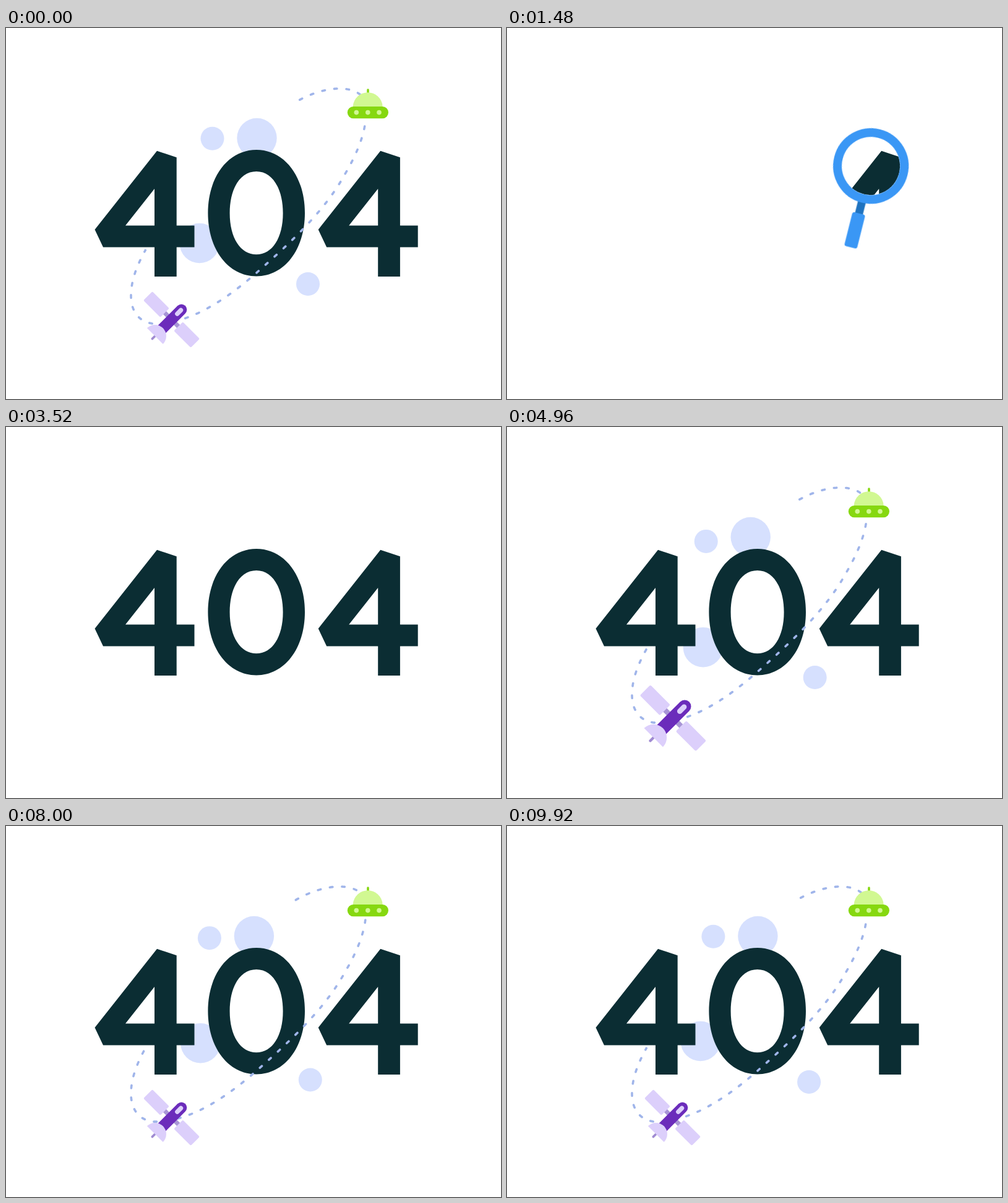
An HTML page that plays this animation: 800x600 px, repeating every 9960 ms.

```html
<!DOCTYPE html>
<html lang="en">
<head>
<meta charset="utf-8">
<title>404</title>
<style>
@property --x { syntax: "<number>"; inherits: true; initial-value: 138; }
@property --y { syntax: "<number>"; inherits: true; initial-value: 411; }
@property --turn { syntax: "<number>"; inherits: true; initial-value: 30; }
@property --zoom { syntax: "<number>"; inherits: true; initial-value: 40; }

html, body { margin: 0; width: 100%; height: 100%; overflow: hidden; background: #fff; }
svg { position: absolute; left: 0; top: 0; width: 800px; height: 600px; }

.stage {
  --loop: 9960ms;
  --swing: cubic-bezier(.37, 0, .63, 1);
  position: relative; width: 800px; height: 600px; overflow: hidden;
  animation: x var(--loop) var(--swing) infinite, y var(--loop) var(--swing) infinite,
    turn var(--loop) var(--swing) infinite, zoom var(--loop) var(--swing) infinite;
}

/* The digits show only through the glass until it has grown past them. */
.digits {
  fill: #0b2d33;
  clip-path: circle(calc(var(--zoom) * 47px) at calc(var(--x) * 1px) calc(var(--y) * 1px));
}
.lens {
  transform: translate(calc(var(--x) * 1px), calc(var(--y) * 1px))
    rotate(calc(var(--turn) * 1deg)) scale(var(--zoom));
  animation: lens-fade var(--loop) linear infinite;
}

.dot, .ufo, .satellite { transform-box: fill-box; transform-origin: center; }
.dot {
  fill: #d6e0fe;
  animation: dot-pop var(--loop) ease-out infinite, drift var(--loop) linear infinite;
}
.ufo { animation: ufo-pop var(--loop) ease-in-out infinite; }
.satellite { animation: satellite-pop var(--loop) ease-in-out infinite; }

.trail {
  fill: none; stroke: #a0b5ea; stroke-width: 3.6; stroke-linecap: round;
  stroke-dasharray: 4.5 15.14;
  animation: flow var(--loop) linear infinite;
}
.reveal {
  fill: none; stroke: #fff; stroke-width: 16; stroke-dasharray: 820;
  animation: draw var(--loop) ease-in-out infinite;
}

@keyframes x {
  0%, 3.715% { --x: 138; }
  18.25%, 20.28% { --x: 653; }
  30.522%, 100% { --x: 388; }
}
@keyframes y {
  0%, 3.715% { --y: 411; }
  12.8% { --y: 213; }
  26.155% { --y: 391; }
  30.522%, 100% { --y: 318; }
}
@keyframes turn {
  0%, 8.966% { --turn: 30; }
  28.233%, 100% { --turn: -45; }
}
@keyframes zoom {
  0% { --zoom: 40; animation-timing-function: step-end; }
  .4% { --zoom: 0; animation-timing-function: ease-out; }
  3.7%, 30.522% { --zoom: 1; }
  34.9% { --zoom: 6.4; animation-timing-function: step-end; }
  35.1%, 100% { --zoom: 40; }
}
@keyframes lens-fade {
  0% { opacity: 0; animation-timing-function: step-end; }
  .4%, 32.6% { opacity: 1; }
  34.9%, 100% { opacity: 0; }
}
@keyframes dot-pop {
  0% { scale: 1; animation-timing-function: step-end; }
  .4%, 37.7% { scale: 0; }
  41% { scale: 1.1; }
  43%, 100% { scale: 1; }
}
@keyframes ufo-pop {
  0% { scale: 1; animation-timing-function: step-end; }
  .4%, 39.8% { scale: 0; }
  42.4% { scale: 1.2; }
  44.4% { scale: .95; }
  46.4%, 100% { scale: 1; }
}
@keyframes satellite-pop {
  0% { scale: 1; animation-timing-function: step-end; }
  .4%, 47.2% { scale: 0; }
  49.8% { scale: 1.18; }
  51.8% { scale: .95; }
  53.8%, 100% { scale: 1; }
}
@keyframes drift {
  0% { translate: 0 0; animation-timing-function: step-end; }
  .4%, 37.75% { translate: var(--dx) var(--dy); }
  100% { translate: 0 0; }
}
@keyframes flow {
  0% { stroke-dashoffset: -9.75; animation-timing-function: step-end; }
  .4%, 37.75% { stroke-dashoffset: 139.3; }
  100% { stroke-dashoffset: -10.7; }
}
@keyframes draw {
  0% { stroke-dashoffset: 0; animation-timing-function: step-end; }
  .4%, 37.75% { stroke-dashoffset: 820; }
  47.8%, 100% { stroke-dashoffset: 0; }
}
</style>
</head>
<body>
<div class="stage">
  <svg viewBox="0 0 800 600">
    <circle class="dot" cx="333.5" cy="178.7" r="19" style="--dx:-14.6px;--dy:7.7px"/>
    <circle class="dot" cx="405.5" cy="178" r="32.2" style="--dx:-14.6px;--dy:0px"/>
    <circle class="dot" cx="312.7" cy="348" r="32.2" style="--dx:5.2px;--dy:10.3px"/>
    <circle class="dot" cx="488" cy="414" r="19" style="--dx:12px;--dy:-11.2px"/>
  </svg>

  <svg class="digits" viewBox="0 0 800 600" fill-rule="evenodd">
    <path id="four" d="M143.5 326 244 198.7 275.7 209.3V319.5H304.5V354.5H275.7V402H240V354.5H157ZM240 260V319.5H193Z"/>
    <use href="#four" x="361.2"/>
    <path d="M404.7 197C450 197 483 240 483 299.3S450 401.5 404.7 401.5 326.4 358.5 326.4 299.3 359.5 197 404.7 197Z
      M404.7 232C379 232 361.6 259 361.6 299.3S379 366.3 404.7 366.3 447.6 339.5 447.6 299.3 430 232 404.7 232Z"/>
  </svg>

  <svg viewBox="0 0 800 600">
    <defs>
      <path id="route" d="M466 121C515 92 560 92 577 112C588 140 580 182 548 236C516 295 460 347 407 394
        C365 431 300 481 236 478C212 474 202 455 202 433C202 408 212 383 226 358"/>
      <mask id="drawn" maskUnits="userSpaceOnUse" x="0" y="0" width="800" height="600">
        <use class="reveal" href="#route"/>
      </mask>
    </defs>
    <g mask="url(#drawn)">
      <use class="trail" href="#route"/>
    </g>

    <g class="ufo" fill="#d1f892">
      <path d="M585 100V106" stroke="#86d810" stroke-width="3.6" stroke-linecap="round"/>
      <path d="M560.8 128V126A24 24 0 0 1 608.6 126V128Z"/>
      <rect x="551.8" y="127" width="66.2" height="19.2" rx="9.6" fill="#86d810"/>
      <circle cx="566.3" cy="136.6" r="3.8"/>
      <circle cx="584.8" cy="136.6" r="3.8"/>
      <circle cx="603" cy="136.6" r="3.8"/>
    </g>

    <g class="satellite">
      <g transform="translate(267.5 471.5) rotate(45)" fill="#dccffb">
        <path d="M-17 0H17" stroke="#a895d6" stroke-width="7"/>
        <rect x="-54" y="-10.2" width="38.6" height="20.4" rx="2"/>
        <rect x="15.6" y="-10.2" width="38.6" height="20.4" rx="2"/>
        <path d="M0 36V44" stroke="#a08bd2" stroke-width="3.6" stroke-linecap="round"/>
        <path d="M-8.8 25V-22.6A8.8 8.8 0 0 1 8.8 -22.6V25Z" fill="#6b2cbb"/>
        <rect x="-3.6" y="-25" width="7.2" height="15.5" rx="3.6"/>
        <path d="M-18.2 37.8A18.2 18.2 0 0 1 18.2 37.8Z"/>
      </g>
    </g>

    <g class="lens" fill="#3a97f5">
      <rect x="-6.5" y="58" width="13" height="24" fill="#1f73bf"/>
      <rect x="-10.6" y="79" width="21.2" height="56.5" rx="3.5"/>
      <circle r="54" fill="none" stroke="#3a97f5" stroke-width="14"/>
    </g>
  </svg>
</div>
</body>
</html>
```
